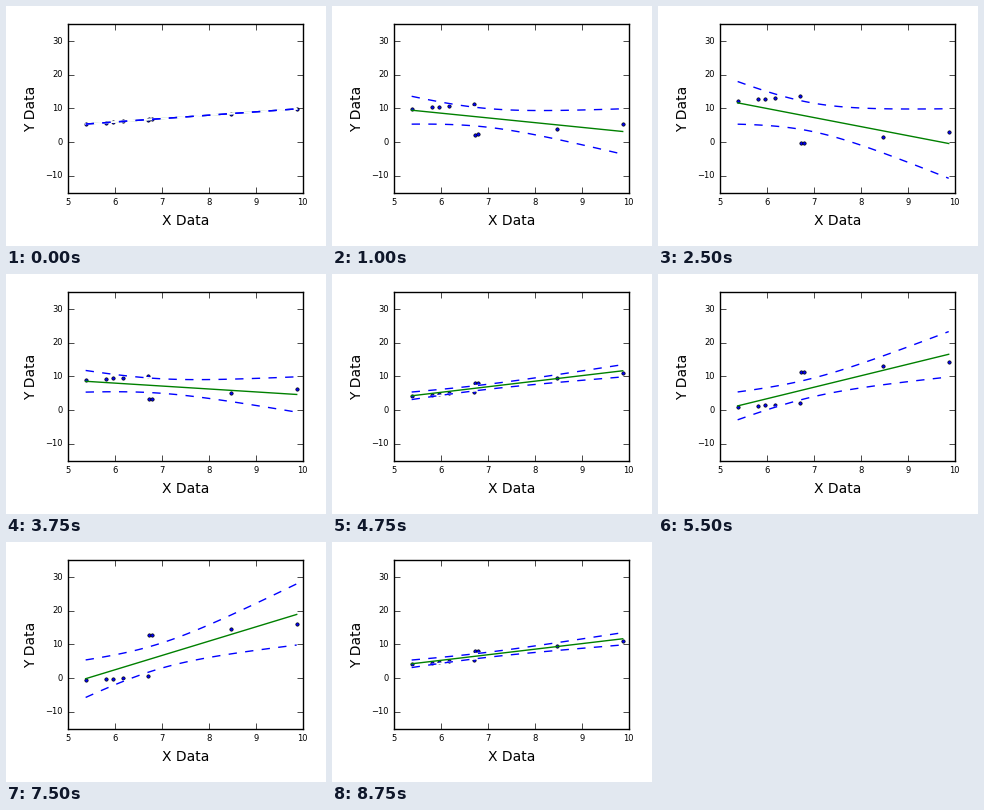
Recreate the animation shown at these times as a matplotlib script. Size 320 px wide and 240 px high, loop 9000 ms.

```python
import numpy as np
import matplotlib.pyplot as plt
from matplotlib.animation import FuncAnimation

FRAMES = 36
AMPLITUDE = 7.0
T_CRIT = 2.3646  # two-sided 95 %, 7 degrees of freedom

plt.style.use("classic")
plt.rcParams.update({
    "font.family": "DejaVu Sans",
    "font.size": 10,
    "axes.labelsize": 10,
    "xtick.labelsize": 6,
    "ytick.labelsize": 6,
    "figure.facecolor": "white",
})

x = np.array([5.37, 5.80, 5.95, 6.17, 6.71, 6.73, 6.78, 8.46, 9.87])
side = np.where(np.arange(x.size) < 5, 1.0, -1.0)
grid = np.linspace(x.min(), x.max(), 100)


def fit_band(y):
    """Least-squares line on the grid and its confidence half-width."""
    slope, offset = np.polyfit(x, y, 1)
    sse = np.sum((y - slope * x - offset) ** 2)
    dx = x - x.mean()
    spread = 1 / x.size + (grid - x.mean()) ** 2 / np.sum(dx ** 2)
    half = T_CRIT * np.sqrt(sse / (x.size - 2) * spread)
    return slope * grid + offset, half


fig = plt.figure(figsize=(3.2, 2.4), dpi=100)
ax = fig.add_axes([62.3 / 320, 53.3 / 240, 234.5 / 320, 168.5 / 240])
ax.set_xlim(5, 10)
ax.set_ylim(-15, 35)
ax.set_xticks(range(5, 11))
ax.set_yticks(range(-10, 31, 10))
ax.set_xlabel("X Data")
ax.set_ylabel("Y Data")

points, = ax.plot([], [], "bo", markersize=2.4)
line, = ax.plot([], [], "g-")
# White underlay keeps the gaps between dashes clear.
under = [ax.plot([], [], "w-", lw=1.2)[0] for _ in range(2)]
bands = [ax.plot([], [], "b--")[0] for _ in range(2)]


def update(i):
    y = x + AMPLITUDE * np.sin(2 * np.pi * i / FRAMES) * side
    fit, half = fit_band(y)
    points.set_data(x, y)
    line.set_data(grid, fit)
    for edges in (under, bands):
        edges[0].set_data(grid, fit - half)
        edges[1].set_data(grid, fit + half)
    return [points, line, *under, *bands]


anim = FuncAnimation(fig, update, frames=FRAMES, interval=250, repeat=True)
plt.show()
```
